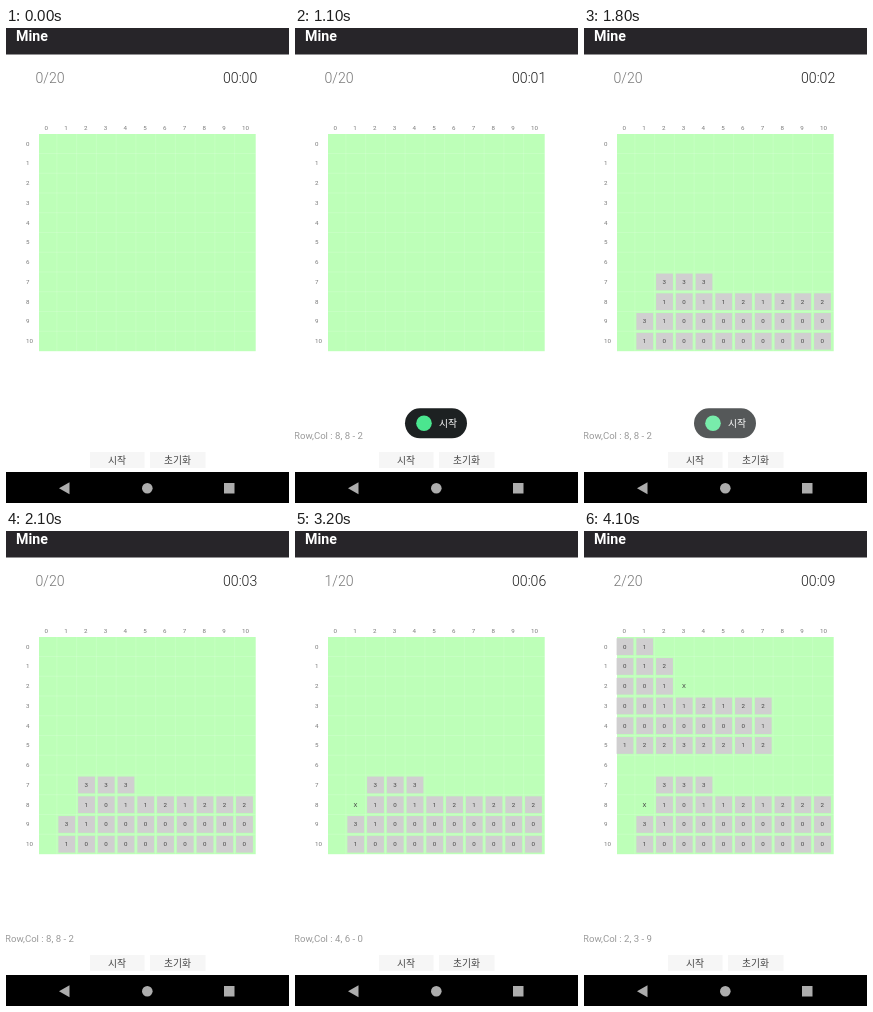
An HTML page for the animation above (4400 ms loop, 283x475 px).

```html
<!DOCTYPE html>
<html lang="ko">
<head>
<meta charset="utf-8">
<style>
  html, body { margin: 0; width: 100%; height: 100%; overflow: hidden; background: #fff; }
  svg { display: block; width: 100%; height: 100%; }
  text { font-family: Roboto, "Noto Sans CJK KR", "Noto Sans CJK", sans-serif; white-space: pre; }
  .axis { font-size: 6.2px; fill: #777; }
  .cell { font-size: 6.2px; fill: #444; text-anchor: middle; }
  .hangul { font-family: "Noto Sans CJK KR", "Noto Sans CJK", sans-serif; font-size: 9.8px; text-anchor: middle; }
  .readout { font-size: 14.1px; font-weight: 300; }
</style>
</head>
<body>
<svg id="stage" viewBox="0 0 283 475">
  <rect width="283" height="475" fill="#fff"/>
  <rect width="283" height="26.5" fill="#272529"/>
  <text x="10" y="13" font-size="14.2" font-weight="700" fill="#fff">Mine</text>
  <text id="count" class="readout" x="29.5" y="55" fill="#777"></text>
  <text id="clock" class="readout" x="217" y="55" fill="#222"></text>
  <rect x="33" y="106" width="216.7" height="217.2" fill="#bdffb8"/>
  <g id="board"></g>
  <text id="status" x="-1" y="411.3" font-size="9.6" fill="#999"></text>
  <g fill="#f6f6f6">
    <rect x="84" y="424" width="54.5" height="16"/>
    <rect x="144" y="424" width="55.5" height="16"/>
  </g>
  <g class="hangul" fill="#444">
    <text x="111" y="436">시작</text>
    <text x="171.5" y="436">초기화</text>
  </g>
  <g id="toast">
    <rect x="110" y="380.3" width="62" height="30" rx="15" fill="#1d2122"/>
    <g id="toastBody">
      <circle cx="129" cy="395.3" r="7.8" fill="#4be68f"/>
      <text class="hangul" x="153" y="399" fill="#fff">시작</text>
    </g>
  </g>
  <rect y="444" width="283" height="31" fill="#000"/>
  <g fill="#adadad">
    <path d="M53 460.3L63.5 454.3V466.3Z"/>
    <circle cx="141.3" cy="460.3" r="5.3"/>
    <rect x="218" y="455" width="10.5" height="10.5"/>
  </g>
</svg>
<script>
const LOOP = 4400, SIZE = 11, PITCH = 19.75;
const $ = id => document.getElementById(id);
const board = $('board');

function add(parent, tag, attrs, label) {
  const el = document.createElementNS('http://www.w3.org/2000/svg', tag);
  for (const key in attrs) el.setAttribute(key, attrs[key]);
  if (label !== undefined) el.textContent = label;
  parent.appendChild(el);
  return el;
}

const colX = c => 41 + PITCH * c;
const rowY = r => 115.6 + PITCH * r;

function mark(group, r, c, label) {
  add(group, 'text', { class: 'cell', x: colX(c) - .3, y: rowY(r) + 2.1 }, label);
}

for (let i = 0; i < SIZE; i++) {
  add(board, 'text', { class: 'axis', x: 38.5 + PITCH * i, y: 101.6 }, i);
  add(board, 'text', { class: 'axis', x: 20, y: rowY(i) + 2.1 }, i);
  if (!i) continue;
  const x = colX(i - .5), y = rowY(i - .5);
  add(board, 'path', {
    d: `M${x} 106V323.2M33 ${y}H249.7`,
    stroke: '#fff', 'stroke-width': .7, 'stroke-opacity': .2
  });
}

// Each entry: row, first column, digits revealed from there.
function region(rows) {
  const group = add(board, 'g', {});
  for (const [r, first, digits] of rows) {
    [...digits].forEach((digit, i) => {
      const c = first + i;
      add(group, 'rect', { x: colX(c) - 8.4, y: rowY(r) - 8.3, width: 16.8, height: 16.8, fill: '#d0cfd0' });
      mark(group, r, c, digit);
    });
  }
  return group;
}

function flag(r, c) {
  const group = add(board, 'g', {});
  mark(group, r, c, 'X');
  return group;
}

const reveals = [
  [1200, region([[7, 2, '333'], [8, 2, '101121222'], [9, 1, '3100000000'], [10, 1, '1000000000']])],
  [3300, region([[0, 0, '01'], [1, 0, '012'], [2, 0, '001'], [3, 0, '00112122'],
                 [4, 0, '00000001'], [5, 0, '12232212']])]
];
const flags = [[2700, flag(8, 1)], [3900, flag(2, 3)]];
const ticks = [1100, 1600, 2100, 2500, 2800, 3000, 3300, 3500, 4100];
const taps = [[600, '7, 4 - 3'], [1100, '8, 8 - 2'], [2600, '8, 1 - 9'], [3200, '4, 6 - 0'], [3800, '2, 3 - 9']];

const clamp = v => Math.max(0, Math.min(1, v));

function draw(t) {
  const step = Math.floor(t / 100) * 100;
  for (const [at, group] of [...reveals, ...flags])
    group.setAttribute('visibility', t >= at ? 'visible' : 'hidden');

  $('count').textContent = flags.filter(([at]) => t >= at).length + '/20';
  $('clock').textContent = '00:0' + ticks.filter(at => t >= at).length;
  const tap = taps.filter(([at]) => t >= at).pop();
  $('status').textContent = tap ? 'Row,Col : ' + tap[1] : '';

  $('toast').setAttribute('opacity', t < 600 ? 0 : clamp((2100 - step) / 400));
  $('toastBody').setAttribute('opacity', clamp(.2 + (step - 600) / 375));
}

function loop() {
  draw(performance.now() % LOOP);
  requestAnimationFrame(loop);
}
loop();
</script>
</body>
</html>
```
